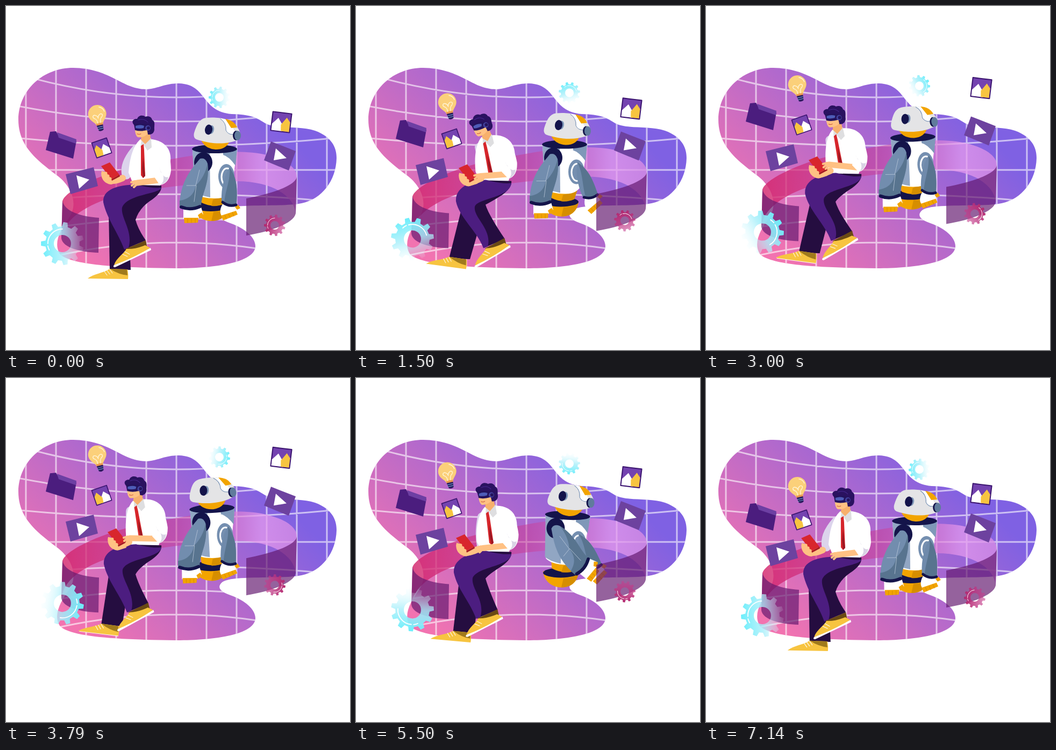
An HTML page that plays this animation: 640x640 px, repeating every 7210 ms.

```html
<!DOCTYPE html>
<html lang="en">
<head>
<meta charset="utf-8">
<title>Virtual reality and robot</title>
<style>
  html, body { margin: 0; width: 100%; height: 100%; overflow: hidden; background: #fff; }
  svg { display: block; width: 100%; height: 100%; }
</style>
</head>
<body>
<svg viewBox="0 0 640 640" stroke-linecap="round" stroke-linejoin="round">
  <defs>
    <linearGradient id="sky" gradientUnits="userSpaceOnUse" x1="150" y1="480" x2="450" y2="170">
      <stop stop-color="#f273b0"/><stop offset="1" stop-color="#7f61e3"/>
    </linearGradient>
    <linearGradient id="wall" gradientUnits="userSpaceOnUse" x1="105" y1="0" x2="541" y2="0">
      <stop stop-color="#d3246b" stop-opacity=".82"/>
      <stop offset=".5" stop-color="#c83a95" stop-opacity=".5"/>
      <stop offset=".85" stop-color="#e79cf0" stop-opacity=".72"/>
      <stop offset="1" stop-color="#d58be4" stop-opacity=".8"/>
    </linearGradient>
    <linearGradient id="cyan">
      <stop stop-color="#6beefb"/>
      <stop offset=".5" stop-color="#a8effa" stop-opacity=".8"/>
      <stop offset="1" stop-color="#e4fbff" stop-opacity=".1"/>
    </linearGradient>
    <linearGradient id="rose">
      <stop stop-color="#b3286f"/><stop offset="1" stop-color="#c63f8f" stop-opacity=".55"/>
    </linearGradient>
    <path id="blob" d="M23,211C24,155 70,115 125,115C195,116 215,155 262,155C285,153 295,144 322,144C375,146 362,196 420,201C455,202 465,207 482,218C505,230 545,222 575,232C605,243 615,262 615,283C614,325 588,359 550,367C510,375 420,366 402,380C390,391 402,399 420,405C444,414 464,430 464,447C463,477 390,488 317,488C230,487 120,484 100,461C87,440 103,414 116,396C138,365 118,333 96,316C55,285 23,260 23,211Z"/>
    <clipPath id="blobClip"><use href="#blob"/></clipPath>
  </defs>

  <use href="#blob" fill="url(#sky)"/>
  <path id="grid" clip-path="url(#blobClip)" fill="none" stroke="#fff" stroke-opacity=".6" stroke-width="3"/>

  <path data-bob="11.5" fill="url(#wall)" d="M105,365C105,345 180,310 250,296C330,280 420,262 485,277C525,287 541,303 541,317L539,386C535,350 490,325 425,326C330,332 240,342 185,360C135,378 103,405 103,437Z"/>
  <path data-bob="11.5" fill="#64196f" fill-opacity=".68" d="M105,362C108,382 140,392 173,394L172,459C140,458 105,450 103,432Z"/>

  <g data-bob="29.5"><g transform="translate(170 202) rotate(-13)">
    <path fill="#fbd07a" d="M-6,20C-7,13 -17,9 -17,-1A17,17 0 0 1 17,-1C17,9 7,13 6,20Z"/>
    <path fill="#e9964e" d="M-6,16H6V21H-6Z"/>
    <path fill="#2b1a5e" d="M-6,20H6L5,30Q0,33 -4,30Z"/>
    <path fill="none" stroke="#6fb6d8" d="M-5,23.5H5M-5,27H5"/>
    <path fill="none" stroke="#fff5d8" stroke-width="1.4" d="M-3,16C-2,4 -10,8 -9,2C-7,-3 0,2 0,7C0,2 7,-3 9,2C10,8 2,4 3,16M6,-13Q13,-10 14,-3"/>
  </g></g>

  <g data-bob="28.5">
    <path fill="#4b1d7e" d="M82,234L93,233L97,240L131,251L125,284L74,268Z"/>
    <path fill="#6d3fa3" d="M95,235L131,248L130,256L98,245Z"/>
  </g>
  <g data-bob="23"><g class="photo" transform="translate(178 264) rotate(-19) scale(-1 1)"></g></g>
  <g data-bob="34"><g class="photo" transform="translate(512 216) rotate(7) scale(1.2)"></g></g>
  <g data-bob="23">
    <path fill="#6d429f" d="M111,313L163,300L171,335L120,350Z"/>
    <path fill="#fff" d="M131,315L155,323L136,340Z"/>
  </g>
  <g data-bob="25">
    <path fill="#6d429f" d="M493,252L539,270L526,306L480,287Z"/>
    <path fill="#fff" d="M502,265L522,283L498,287Z"/>
  </g>

  <g data-bob="11.5">
    <path fill="#f2a400" d="M348,370C350,390 366,400 382,400C400,400 412,390 414,372Z"/>
    <path fill="#d68e00" d="M386,383C400,383 410,378 414,372C412,390 400,400 382,400Z"/>
    <ellipse cx="381" cy="373" rx="33" ry="9" fill="#14144a"/>
    <g id="robot">
      <path fill="#f2a400" d="M362,350H412L406,368Q385,376 364,366Z"/>
      <path fill="#d68e00" d="M385,360L412,350L406,368Q396,373 382,372Z"/>
      <path fill="#fff" d="M347,267H430L420,340Q413,358 390,358Q362,358 352,348Z"/>
      <path fill="#91a6c3" d="M347,267L379,270L380,356Q358,352 350,345Z"/>
      <path fill="#7f98b8" d="M404,272L430,267L427,297Q415,280 404,277Z"/>
      <ellipse cx="410" cy="317" rx="15" ry="23" fill="#758fb0"/>
      <ellipse cx="411" cy="318" rx="10" ry="16" fill="none" stroke="#fff" stroke-width="3"/>
      <ellipse cx="388" cy="266" rx="42" ry="8" fill="#14144a"/>
      <g id="robotHead">
        <path fill="#f2a400" d="M362,246L416,251Q410,267 390,267Q367,265 362,246Z"/>
        <path fill="#e4e4e6" d="M350,236C355,220 360,210 372,208C392,206 418,209 428,222C438,235 439,246 427,251C400,260 372,254 354,248Q348,245 350,236Z"/>
        <path fill="#fff" d="M399,209L414,212L424,230L429,238Q412,240 410,233Q412,219 399,209Z"/>
        <path fill="#f2a400" d="M408,210Q425,213 430,226L419,227Z"/>
        <path fill="none" stroke="#7590b4" d="M399,210Q410,217 409,231Q413,240 424,239"/>
        <ellipse cx="382" cy="230" rx="5" ry="8" fill="#7f98b8" transform="rotate(10 382 230)"/>
        <ellipse cx="377" cy="230" rx="7" ry="9.5" fill="#14144a" transform="rotate(10 377 230)"/>
        <ellipse cx="428" cy="241" rx="6" ry="9" fill="#14144a"/>
        <ellipse cx="431" cy="241" rx="6" ry="9" fill="#607b9c"/>
      </g>
      <g id="farArm">
        <path fill="#fff" d="M406,364L427,368L429,382L403,393Q393,382 406,364Z"/>
        <path fill="#f2a400" d="M400,390L428,381L431,388L404,399ZM426,374L432,370L436,376L430,379Z"/>
        <path fill="none" stroke="#d68e00" d="M407,389L410,396M414,387L417,394M421,384L424,391"/>
        <path fill="#6f8aab" d="M416,300C406,316 400,338 401,363Q413,373 429,369C430,348 432,322 416,300Z"/>
        <path fill="#58748f" d="M416,300C418,324 408,342 406,367Q417,373 429,369C430,348 432,322 416,300Z"/>
        <path fill="none" stroke="#14144a" stroke-width="5" d="M403,365Q414,374 428,370"/>
      </g>
      <ellipse cx="367" cy="291" rx="17" ry="19" fill="#14144a"/>
      <g id="nearArm">
        <path fill="#fff" d="M330,376L363,374L367,388L357,396H330Z"/>
        <path fill="#f2a400" d="M331,394H358L357,403L332,404ZM357,389L364,384L368,390L360,396Z"/>
        <path fill="none" stroke="#d68e00" d="M338,396V403M345,396V403M352,396V403"/>
        <path fill="#728dae" d="M361,284C348,300 323,325 323,373Q342,382 363,372C363,350 380,330 375,293Q371,281 361,284Z"/>
        <path fill="#58748f" d="M353,334C350,352 338,360 323,362V373Q342,382 363,372C363,350 380,330 375,293Q370,318 353,334Z"/>
        <path fill="none" stroke="#b9c7da" stroke-width=".8" d="M336,334H354L350,364M353,334L360,305"/>
        <path fill="none" stroke="#14144a" stroke-width="6" d="M326,374Q343,381 361,373"/>
      </g>
    </g>
  </g>

  <g data-bob="11.5">
    <path id="backLeg" fill="#250d40"/>
    <g id="backShoe">
      <path fill="#fff" d="M-60,16L14,17V19L-59,18Z"/>
      <path fill="#f7c440" d="M-61,17C-50,8 -32,7 -20,-1L13,0Q15,10 14,18Z"/>
      <path fill="#a07a1c" d="M-20,-1L12,0L13,11Q-2,10 -20,-1Z"/>
      <path fill="none" stroke="#fff" d="M-30,4L-25,11M-25,2L-20,9M-20,0L-15,7"/>
    </g>
    <path id="farSleeve" fill="none" stroke="#dcd4ec" stroke-width="17"/>
    <g class="torso">
      <path fill="#fff" d="M250,248C237,259 230,282 228,310L240,340H284L303,300C312,276 302,252 272,248Z"/>
      <path fill="#dedee0" d="M252,249L270,246L271,263L263,269L256,258L250,264Z"/>
      <path fill="#d6262b" d="M251,260L256,257L257,268L259,316L255,320L251,315Z"/>
      <path fill="#9e1722" d="M255,282L259,316L255,320L253,302Z"/>
      <g id="head">
        <path fill="#f7b06c" d="M253,236L267,230L269,247L259,257L251,249Z"/>
        <path fill="#ffc183" d="M240,222H266V236Q256,246 245,244Q239,240 240,222Z"/>
        <path fill="#2a1260" d="M239,222C232,216 236,209 244,210C247,202 256,203 259,206C266,204 271,207 272,212C279,215 275,224 276,229C276,237 270,240 264,239L261,222C251,222 246,218 239,222Z"/>
        <path fill="none" stroke="#4a2b93" d="M246,212Q257,208 264,216"/>
        <path fill="#24135c" d="M238,220Q250,217 263,221L262,231Q250,234 240,231Z"/>
        <path fill="#4e5db8" d="M241,223Q249,220 257,223L256,227Q248,229 241,227Z"/>
        <circle cx="264" cy="227" r="5" fill="#43419c"/>
        <circle cx="265" cy="227" r="3" fill="#24135c"/>
        <path fill="none" stroke="#c8553a" d="M244,238Q248,240 251,238"/>
      </g>
    </g>
    <path id="seat" fill="#250d40"/>
    <path id="frontLeg" fill="#4c1d80"/>
    <g id="frontShoe">
      <path fill="#6a4a14" d="M-17,8L21,-8L24,7L-6,16Z"/>
      <path fill="#fff" d="M-38,38L30,6L31,10L-36,42Q-41,42 -38,38Z"/>
      <path fill="#f7c440" d="M-38,38C-34,25 -20,17 -15,8Q0,9 20,1L29,6Q-2,25 -38,38Z"/>
      <path fill="none" stroke="#fff" d="M-22,18L-13,22M-18,13L-9,18"/>
    </g>
    <path id="farForearm" fill="none" stroke="#ffc183" stroke-width="12"/>
    <g id="phone">
      <path fill="#ffc183" d="M-16,0C-19,12 -12,24 2,25L18,20L14,8L-8,2Z"/>
      <path fill="#d8262d" d="M-17,-9L-1,-16L17,7L2,15Z"/>
      <path fill="#a81a24" d="M17,7L2,15L3,18L18,10Z"/>
      <path fill="none" stroke="#ffc183" stroke-width="5" d="M-14,5L-8,4M-11,11L-4,9M-6,16L0,14"/>
    </g>
    <path id="nearForearm" fill="none" stroke="#ffc183" stroke-width="11"/>
    <path id="fingers" fill="none" stroke="#ffc183" stroke-width="4"/>
    <g class="torso">
      <path fill="#fff" d="M276,250C300,252 307,280 307,306Q304,330 287,333L276,318Q288,305 282,282Z"/>
      <path fill="#d9d3e4" d="M285,300Q293,318 279,319L287,333Q301,328 302,318Q292,322 285,300Z"/>
      <path fill="#fff" d="M285,306Q291,318 276,318L286,333Q296,328 292,313Z"/>
    </g>
  </g>

  <path data-bob="11.5" fill="#64196f" fill-opacity=".68" d="M447,358C490,350 540,335 541,317L539,386C535,405 490,420 447,427Z"/>

  <g data-bob="11.5"><g class="gear" data-at="105,442" data-size="40" data-fill="cyan"></g></g>
  <g data-bob="11.5"><g class="gear" data-at="397,170" data-size="20" data-fill="cyan"></g></g>
  <g data-bob="11.5"><g class="gear" data-at="500,408" data-size="20" data-fill="rose"></g></g>
</svg>
<script>
const LOOP = 7210, FRAMES = 101, STEP = LOOP / FRAMES;
const $ = id => document.getElementById(id);
const all = selector => [...document.querySelectorAll(selector)];

function drawGrid() {
  let d = "";
  for (let x = 37; x < 620; x += 56) d += `M${x},100V500`;
  for (let k = -3; k <= 3; k++) {
    const y = 305 + 45 * k, edge = y + 13 * k * (317 / 280) ** 2;
    d += `M0,${edge}Q317,${2 * y - edge} 634,${edge}`;
  }
  $("grid").setAttribute("d", d);
}

function gearPath(radius) {
  const teeth = 11, points = [];
  for (let i = 0; i < teeth; i++)
    for (const [offset, scale] of [[.2, .8], [.33, 1], [.67, 1], [.8, .8]]) {
      const a = (i + offset) / teeth * 2 * Math.PI;
      points.push([Math.cos(a), Math.sin(a)].map(v => (v * scale * radius).toFixed(2)));
    }
  const hole = radius * .4;
  return `M${points.join("L")}ZM${hole},0A${hole},${hole} 0 1 0 ${-hole},0A${hole},${hole} 0 1 0 ${hole},0Z`;
}

function drawGears() {
  for (const gear of all(".gear")) {
    const { size, fill } = gear.dataset, r = size * .68;
    gear.innerHTML = `<path d="${gearPath(+size)}" fill="url(#${fill})" fill-rule="evenodd"/>
      <path d="M${-r},0A${r},${r} 0 0 1 0,${-r}M${-r * .9},${r * .44}A${r},${r} 0 0 1 ${-r},${r * .16}"
        fill="none" stroke="#fff" stroke-width="${size / 22}"/>`;
  }
}

function drawPhotos() {
  for (const photo of all(".photo")) photo.innerHTML = `
    <rect x="-15.5" y="-15.5" width="31" height="31" rx="1" fill="#3c1670"/>
    <rect x="-13.8" y="-13.8" width="27.6" height="27.6" fill="#7443b0"/>
    <path d="M-13.8,13.8V4L-5,-6L4,6V13.8Z" fill="#fff"/>
    <path d="M1,13.8L0,4L8,-8L13.8,-1V13.8Z" fill="#f7c440"/>`;
}

// Smooth periodic interpolation through poses at fixed moments.
const moments = [0, 1500, 2210, 3790, 4790, 6210];
function track(...values) {
  const n = values.length;
  const time = i => moments[(i + n) % n] + LOOP * Math.floor(i / n);
  const value = i => values[(i + n) % n];
  const rate = i => (value(i + 1) - value(i)) / (time(i + 1) - time(i));
  const tangent = i => {
    const a = rate(i - 1), b = rate(i);
    return a * b <= 0 ? 0 : 2 * a * b / (a + b);
  };
  return t => {
    const i = moments.findLastIndex(m => m <= t);
    const span = time(i + 1) - time(i), u = (t - time(i)) / span;
    const ease = u * u * (3 - 2 * u);
    return value(i) * (1 - ease) + value(i + 1) * ease
      + span * u * (1 - u) * ((1 - u) * tangent(i) - u * tangent(i + 1));
  };
}
const point = (xs, ys) => {
  const x = track(...xs), y = track(...ys);
  return t => [x(t), y(t)];
};

const pose = {
  lean: track(0, -10, -9.5, -8.5, -6.5, -6),
  nod: track(0, -6, 2, 8, 6, -1),
  knee: point([181, 186, 186, 182, 181, 183], [365, 372, 372, 369, 373, 372]),
  seatY: track(398, 378, 382, 388, 389, 378),
  ankle: point([239, 256, 256, 244, 236, 249], [444, 450, 449, 450, 452, 446]),
  frontShoe: track(0, 5, 6, 3, -1, 4),
  heel: point([213, 193, 190, 197, 202, 199], [490, 478.5, 478.5, 483, 484, 483]),
  backShoe: track(0, 7, 7.5, 6, 3.5, 5),
  elbow: point([220, 236, 236, 232, 230, 229], [320, 329, 328, 328, 331, 326]),
  phone: point([194, 208, 209, 206, 203, 203], [307, 319, 316, 318.5, 319, 314]),
  hand: point([240, 227, 224, 226, 231, 233], [329, 325, 314, 321, 329, 325]),
  robot: track(0, 0, -.5, -2.6, 2, 3.6),
  robotHead: track(0, 0, -1.5, -6, -1, -1.5),
  nearArm: track(0, 0, 0, 2, -40, -60),
  farArm: track(0, -22, 0, 1, -6, -50)
};

const PIVOT = [268, 345];
function leaned(x, y, degrees) {
  const a = degrees * Math.PI / 180, dx = x - PIVOT[0], dy = y - PIVOT[1];
  return [PIVOT[0] + dx * Math.cos(a) - dy * Math.sin(a), PIVOT[1] + dx * Math.sin(a) + dy * Math.cos(a)];
}
const shape = (id, d) => $(id).setAttribute("d", d);
const move = (element, transform) => element.setAttribute("transform", transform);
const turn = (id, degrees, x, y) => move($(id), `rotate(${degrees} ${x} ${y})`);

function drawLegs(t) {
  const [kx, ky] = pose.knee(t), [ax, ay] = pose.ankle(t), [hx, hy] = pose.heel(t), sy = pose.seatY(t);
  const thighY = 350 + (398 - sy) * .8;
  shape("backLeg", `M${kx + 10},${ky + 15}L${hx - 20},${hy}L${hx + 19},${hy + 1}L${kx + 47},${ky + 35}Z`);
  shape("seat", `M240,333L289,334Q291,346 272,360Q248,375 241,${sy}Q246,${sy + 18} ${ax + 21},${ay - 8}
    L${ax - 17},${ay + 8}L${kx + 25},${ky}Z`);
  shape("frontLeg", `M242,332Q270,340 289,338C286,${thighY} 225,${thighY} ${kx + 35},${ky + 10}
    C${kx + 32},${ky + 30} ${ax - 2},${ay - 26} ${ax - 11},${ay + 6}L${ax - 19},${ay + 9}
    C${ax - 30},${ay - 22} ${kx + 6},${ky + 30} ${kx},${ky}C${kx - 2},${ky - 28} 218,333 242,332Z`);
  move($("frontShoe"), `translate(${ax} ${ay}) rotate(${-pose.frontShoe(t)})`);
  move($("backShoe"), `translate(${hx} ${hy}) rotate(${pose.backShoe(t)})`);
}

function drawArms(t, lean) {
  const [ex, ey] = pose.elbow(t), [px, py] = pose.phone(t), [nx, ny] = pose.hand(t);
  const [sx, sy] = leaned(243, 266, lean), [cx, cy] = leaned(284, 324, lean);
  shape("farSleeve", `M${sx},${sy}Q${ex - 1},${(sy + ey) / 2} ${ex + 4},${ey - 6}`);
  shape("farForearm", `M${ex - 3},${ey}Q${ex - 14},${ey + 5} ${px + 4},${py + 18}`);
  move($("phone"), `translate(${px} ${py})`);
  shape("nearForearm", `M${cx},${cy}L${nx + 4},${ny}`);
  shape("fingers", `M${nx},${ny - 3}L${nx - 7},${ny - 1}M${nx},${ny}L${nx - 6},${ny + 5}M${nx + 4},${ny + 2}L${nx - 2},${ny + 8}`);
}

function render(now) {
  const frame = Math.floor((now % LOOP + 5) / STEP) % FRAMES;
  const t = frame * STEP, phase = frame / FRAMES;
  const rise = 1 - Math.cos(phase * 2 * Math.PI);
  const lean = pose.lean(t);

  for (const item of all("[data-bob]")) move(item, `translate(0 ${-item.dataset.bob * rise})`);
  for (const gear of all(".gear")) move(gear, `translate(${gear.dataset.at}) rotate(${phase * 360})`);
  for (const part of all(".torso")) move(part, `rotate(${lean} ${PIVOT})`);
  turn("head", pose.nod(t), 262, 247);
  drawLegs(t);
  drawArms(t, lean);
  turn("robot", pose.robot(t), 383, 372);
  turn("robotHead", pose.robotHead(t), 393, 262);
  turn("nearArm", pose.nearArm(t), 368, 290);
  turn("farArm", pose.farArm(t), 412, 310);
}

drawGrid();
drawGears();
drawPhotos();
const start = performance.now();
function tick() {
  render(performance.now() - start);
  requestAnimationFrame(tick);
}
tick();
</script>
</body>
</html>
```
